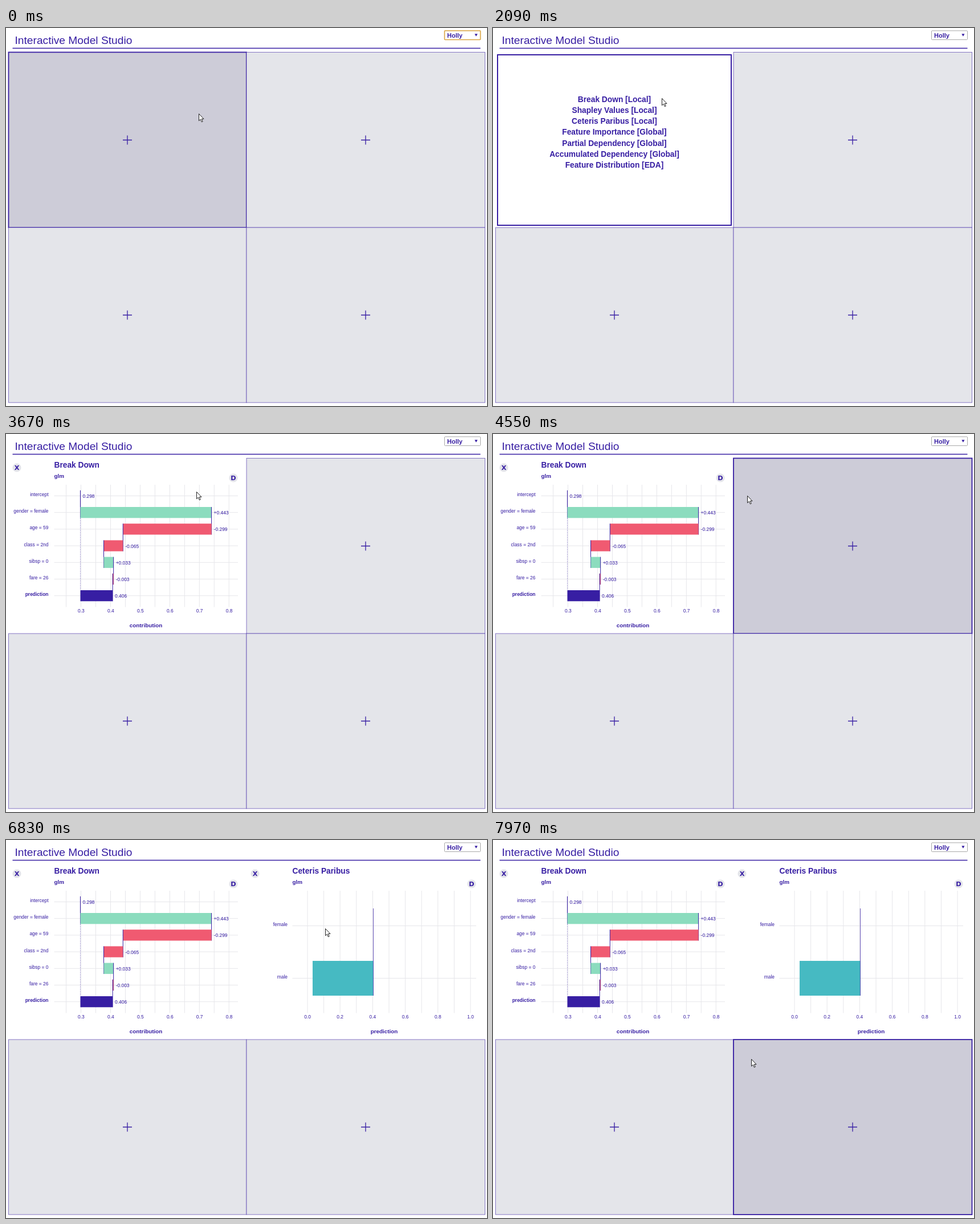
Animation, 844 px wide and 663 px high, one loop 8000 ms. Source, as an HTML page:

```html
<!DOCTYPE html>
<html lang="en">
<head>
<meta charset="utf-8">
<title>Interactive Model Studio</title>
<style>
  html, body { margin: 0; width: 100%; height: 100%; overflow: hidden; background: #fff; }
  svg { display: block; font-family: Arial, "Liberation Sans", sans-serif; fill: #371ea3; }
  .b { font-weight: bold; }
  .wide { font: bold 11.3px "DejaVu Sans", sans-serif; }
  .grid { stroke: #e6e6ea; stroke-width: 1; }
  .line { stroke: #371ea3; stroke-width: 1; }
  .cell rect { fill: #e4e5ea; stroke: #371ea3; stroke-opacity: .58; }
  .cell path { stroke: #371ea3; stroke-width: 1.3; }
  .cell.hover rect { fill: #cdccd8; stroke-opacity: 1; stroke-width: 1.8; }
  .frame { fill: #fff; stroke: #371ea3; stroke-width: 2; }
</style>
</head>
<body>
<svg id="stage" width="844" height="663" viewBox="0 0 844 663"></svg>
<script>
const LOOP = 8000;
const stage = document.getElementById('stage');

const text = (x, y, size, s, cls = '', anchor = 'start') =>
  `<text x="${x}" y="${y}" font-size="${size}" class="${cls}" text-anchor="${anchor}">${s}</text>`;
const line = (x1, y1, x2, y2, cls = 'line', more = '') =>
  `<line x1="${x1}" y1="${y1}" x2="${x2}" y2="${y2}" class="${cls}" ${more}/>`;
const rect = (x, y, w, h, more = '') =>
  `<rect x="${x}" y="${y}" width="${w}" height="${h}" ${more}/>`;
const group = (id, body, more = '') => `<g id="${id}" ${more}>${body}</g>`;
const each = (list, f) => list.map(f).join('');
const range = n => [...Array(n).keys()];

const cells = [[4.5, 42.5], [422, 42.5], [4.5, 350], [422, 350]]
  .map(([x, y]) => ({ x, y, w: x < 9 ? 417.5 : 418.5, h: y < 99 ? 307.5 : 307 }));

const emptyCell = (c, i) => {
  const cx = c.x < 9 ? 213 : 631, cy = c.y < 99 ? 196.5 : 503.5;
  return group('cell' + i,
    rect(c.x, c.y, c.w, c.h) + `<path d="M${cx - 8} ${cy}h16M${cx} ${cy - 8}v16"/>`,
    'class="cell"');
};

const plots = ['Break Down [Local]', 'Shapley Values [Local]', 'Ceteris Paribus [Local]',
  'Feature Importance [Global]', 'Partial Dependency [Global]',
  'Accumulated Dependency [Global]', 'Feature Distribution [EDA]'];

const menu = (id, x, items) => group(id,
  rect(x + 8, 47, 410, 299, 'class="frame"') +
  each(items, (s, i) =>
    text(x + 213, 187.4 + 19.2 * (i - (items.length - 1) / 2), 13.75, s, 'b', 'middle')));

const button = (x, y, s) =>
  `<circle cx="${x}" cy="${y}" r="7.6" fill="#e4e5ea"/>` + text(x, y + 4.1, 11.3, s, 'wide', 'middle');

// Shared title, buttons and grid of a chart
const chartBase = (x, title, axis, rows, ticks) =>
  button(x + 19, 59, 'X') + button(x + 399, 77, 'D') +
  text(x + 84.5, 58.5, 13.75, title, 'b') + text(x + 84.5, 77.3, 9.9, 'glm', 'b') +
  each(ticks, gx => line(gx, 89, gx, 303.5, 'grid')) +
  each(rows, y => line(x + 84.5, y, x + 407, y, 'grid')) +
  text(x + 245.5, 338.5, 9.9, axis, 'b', 'middle');

const label = (x, y, s, cls) => text(x, y, 8.45, s, cls, 'end');
const tick = (x, v) => text(x, 312.5, 8.45, v.toFixed(1), '', 'middle');

function breakDown() {
  const px = v => 131.5 + (v - .3) * 519.5;
  const top = i => 98.8 + 29.2 * i;
  const green = '#8bdcbe', red = '#f05a71', violet = '#371ea3';
  const steps = [ // name, from, to, shown value, colour
    ['intercept', .298, .298, '0.298', violet],
    ['gender = female', .298, .741, '+0.443', green],
    ['age = 59', .741, .442, '-0.299', red],
    ['class = 2nd', .442, .377, '-0.065', red],
    ['sibsp = 0', .377, .41, '+0.033', green],
    ['fare = 26', .41, .407, '-0.003', red],
    ['prediction', .298, .407, '0.406', violet]];
  return chartBase(0, 'Break Down', 'contribution',
      range(7).map(i => top(i) + 9.7), range(12).map(i => px(.25 + .05 * i))) +
    each(range(6), i => tick(px(.3 + .1 * i) + .4, .3 + .1 * i)) +
    line(130.5, 118, 130.5, 274, 'line', 'stroke-dasharray="1 2" opacity=".7"') +
    each(steps, ([name, a, b, value, colour], i) => {
      const lo = px(Math.min(a, b)), hi = px(Math.max(a, b));
      return rect(lo, top(i), hi - lo, 19.3, `fill="${colour}"`) +
        (i < 6 ? line(px(b), top(i), px(b), top(i + 1) + 19.3) : '') +
        label(74.5, top(i) + 10.2, name, i === 6 ? 'b' : '') +
        text(hi + 4, top(i) + 13.1, 8.45, value);
    });
}

function ceterisParibus() {
  const px = v => 529 + 286 * v;
  return chartBase(418, 'Ceteris Paribus', 'prediction',
      [150.5, 242.5], range(11).map(i => px(i / 10))) +
    each(range(6), i => tick(px(i / 5), i / 5)) +
    rect(538, 212, 106.5, 61, 'fill="#46bac2"') +
    line(644.5, 120, 644.5, 273, 'line', 'stroke-width="1.5" opacity=".75"') +
    label(494, 151.3, 'female') + label(494, 243.3, 'male');
}

stage.innerHTML =
  text(15.5, 27.7, 19.2, 'Interactive Model Studio') +
  line(11.5, 35.4, 832.5, 35.4, 'line', 'style="stroke-width:1.5"') +
  rect(769.5, 4.8, 63, 15.7, 'id="select" fill="#fff" rx="1"') +
  text(774, 17, 11, 'Holly', 'b') + '<path d="M822.3 10.3h5.2l-2.6 4.5z"/>' +
  each(cells, emptyCell) +
  menu('menu0', 0, plots) + menu('menu1', 418, plots.slice(1)) +
  group('chart0', breakDown()) + group('chart1', ceterisParibus()) +
  '<path id="cursor" d="M.5 .5V12.8L3.3 10.2L5.3 14.8L7.2 14L5.3 9.5H9Z" fill="#fff" stroke="#222"/>';

const el = id => document.getElementById(id);
const show = (id, on) => { el(id).style.display = on ? '' : 'none'; };

// Pointer path: time, x, y
const path = [
  [0, 338, 150], [480, 338, 150], [680, 345, 149], [950, 332, 164], [1190, 322, 173],
  [1750, 322, 173], [2090, 296, 123], [2420, 261, 122],
  [3160, 261, 122], [3670, 334, 101], [3940, 361, 104], [4390, 446, 108],
  [4850, 446, 108], [5340, 517, 148], [5630, 552, 153], [5740, 560, 157],
  [6800, 560, 157], [6830, 560, 155], [7630, 452, 286], [7960, 453, 384], [LOOP, 453, 384]];

function pointer(t) {
  const i = Math.max(1, path.findIndex(p => p[0] > t));
  const [t0, x0, y0] = path[i - 1], [t1, x1, y1] = path[i];
  const k = (t - t0) / (t1 - t0);
  return [x0 + (x1 - x0) * k, y0 + (y1 - y0) * k];
}

// When each upper cell opens its menu and then its chart
const opens = [[1420, 2540], [4585, 6090]];

function draw(t) {
  const [x, y] = pointer(t);
  el('cursor').setAttribute('transform', `translate(${Math.round(x)} ${Math.round(y)})`);
  const focus = t < 1320;
  el('select').setAttribute('stroke', focus ? '#d9a441' : '#a9a9a9');
  el('select').setAttribute('stroke-width', focus ? 1.6 : 1);
  cells.forEach((c, i) => {
    const inside = x >= c.x && x < c.x + c.w && y >= c.y && y < c.y + c.h;
    el('cell' + i).setAttribute('class', inside ? 'cell hover' : 'cell');
  });
  opens.forEach(([menuAt, chartAt], i) => {
    show('cell' + i, t < menuAt);
    show('menu' + i, t >= menuAt && t < chartAt);
    show('chart' + i, t >= chartAt);
  });
}

const start = performance.now();
function tickFrame(now) {
  draw(Math.max(0, now - start) % LOOP);
  requestAnimationFrame(tickFrame);
}
draw(0);
requestAnimationFrame(tickFrame);
</script>
</body>
</html>
```
